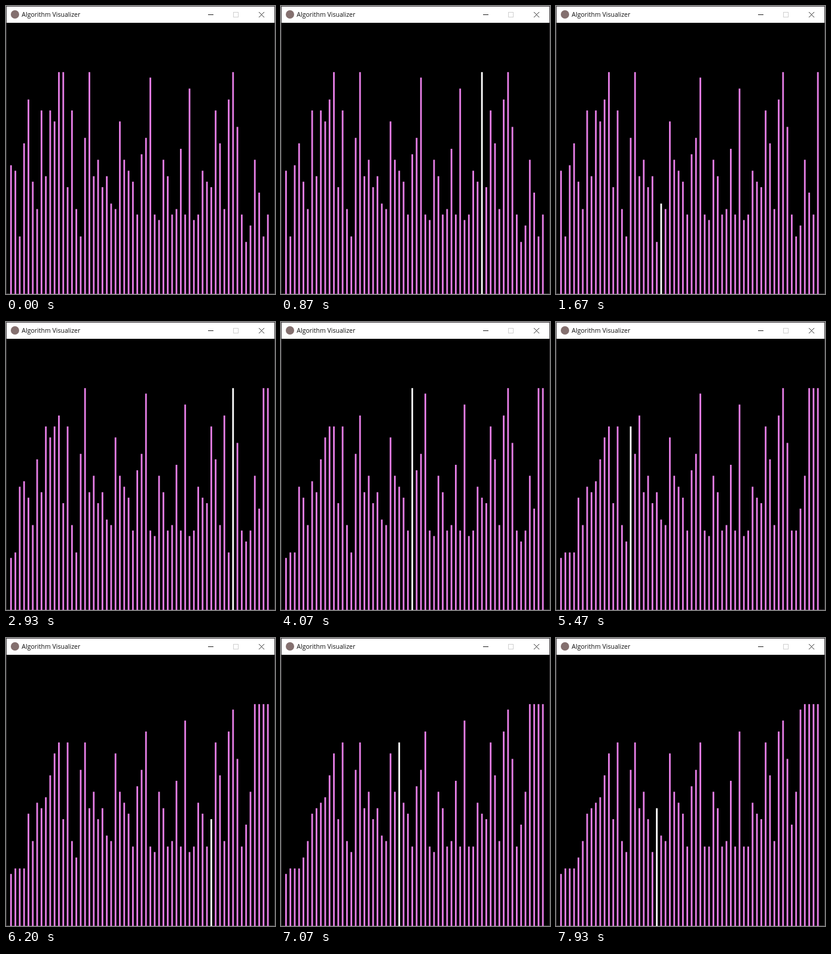
An HTML page for the animation above (8000 ms loop, 450 by 480 pixels).

```html
<!DOCTYPE html>
<html lang="en">
<head>
<meta charset="utf-8">
<title>Algorithm Visualizer</title>
<style>
  html, body { margin: 0; width: 100%; height: 100%; overflow: hidden; background: #000; }
  svg { display: block; width: 450px; height: 480px; }
  text { font: 10.55px "Open Sans", "Noto Sans", sans-serif; fill: #111; }
</style>
</head>
<body>
<svg viewBox="0 0 450 480">
  <rect width="450" height="480" fill="#000"/>
  <rect width="450" height="28" fill="#fff"/>
  <rect x=".5" y=".5" width="449" height="479" fill="none" stroke="#3c383c"/>
  <g id="bars"></g>
  <circle cx="15" cy="14" r="7" fill="#84706f"/>
  <text x="26.3" y="18">Algorithm Visualizer</text>
  <g fill="none" stroke="#222">
    <path d="M338 14.5H347"/>
    <rect x="380.5" y="10.5" width="8" height="8" stroke="#d0d0d0"/>
    <path d="M423 10L432 19M432 10L423 19" stroke-width=".9"/>
  </g>
</svg>
<script>
const LOOP = 8000, TICK = 200 / 3, LAST_TICK = LOOP / TICK - 1, START_TICK = 3;
const BOTTOM = 480, TALLEST_TOP = 110.2, UNIT = 9.13;
const FIRST_X = 7, SPACING = 7.283, BAR_WIDTH = 2.8;

// The list to sort: how many units each bar falls short of the tallest one.
const unsorted = [
  17, 18, 30, 13, 5, 20, 25, 7, 19, 7, 9, 0, 0, 21, 7, 25, 30, 12, 0, 19,
  16, 21, 19, 24, 25, 9, 16, 18, 20, 26, 15, 12, 1, 26, 27, 16, 19, 26, 25, 14,
  26, 3, 27, 26, 18, 20, 21, 7, 13, 25, 5, 0, 10, 26, 31, 28, 16, 22, 30, 26
];

// Cocktail sort, one step per swap; odd passes run to the right.
function sortSteps(values, lastPass, lastActive) {
  const list = [...values], end = list.length - 1;
  const steps = [{ list: [...list], active: -1 }];
  for (let pass = 1; pass <= lastPass; pass++) {
    for (let n = 0; n < end; n++) {
      const i = pass % 2 ? n : end - 1 - n;
      if (list[i] >= list[i + 1]) continue;
      [list[i], list[i + 1]] = [list[i + 1], list[i]];
      steps.push({ list: [...list], active: i + 1 });
      if (pass === lastPass && i + 1 === lastActive) return steps;
    }
  }
  return steps;
}
const steps = sortSteps(unsorted, 10, 22);

const bars = unsorted.map((_, i) => {
  const bar = document.createElementNS("http://www.w3.org/2000/svg", "rect");
  bar.setAttribute("x", FIRST_X + i * SPACING);
  bar.setAttribute("width", BAR_WIDTH);
  return document.getElementById("bars").appendChild(bar);
});

function draw() {
  // The small lead absorbs the rounding of tick times to 10 ms.
  const tick = Math.min(LAST_TICK, Math.floor((performance.now() % LOOP + 4) / TICK));
  const progress = Math.max(0, (tick - START_TICK) / (LAST_TICK - START_TICK));
  const { list, active } = steps[Math.round(progress * (steps.length - 1))];
  bars.forEach((bar, i) => {
    const top = TALLEST_TOP + list[i] * UNIT;
    bar.setAttribute("y", top);
    bar.setAttribute("height", BOTTOM - top);
    bar.setAttribute("fill", i === active ? "#fff" : "#e87fe8");
  });
  requestAnimationFrame(draw);
}
draw();
</script>
</body>
</html>
```
